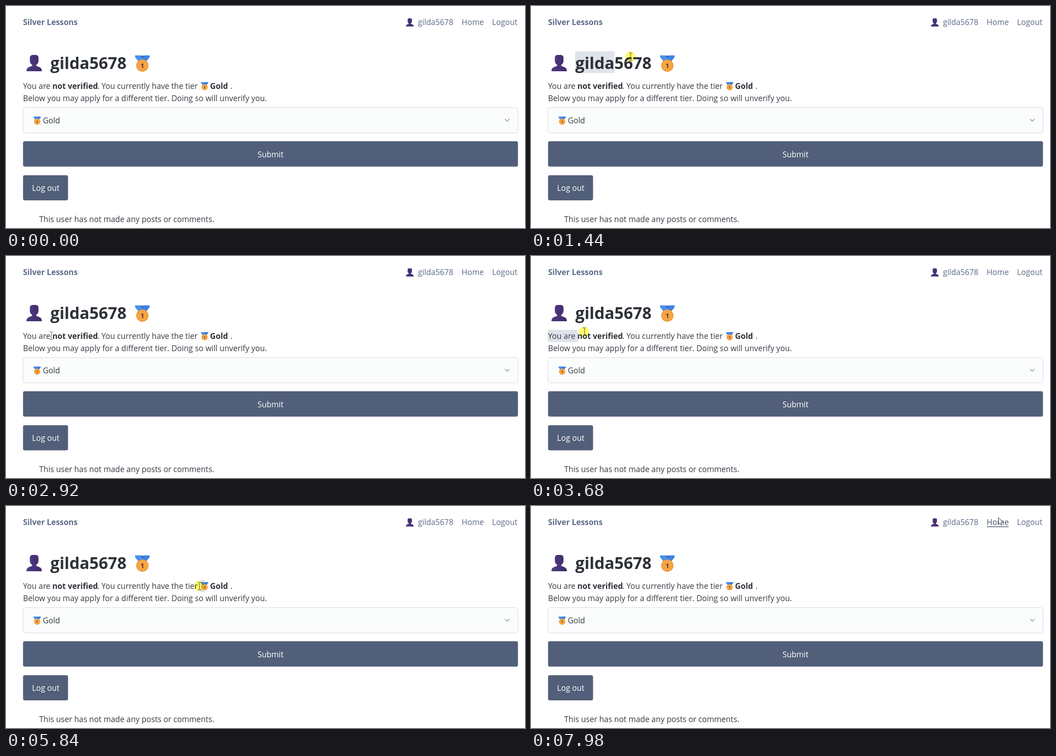
An HTML page with a canvas that plays this animation: 1142x490 px, repeating every 8 s.

```html
<!DOCTYPE html>
<html lang="en">
<head>
<meta charset="utf-8">
<title>Profile page</title>
<style>
  html, body { margin: 0; width: 100%; height: 100%; overflow: hidden; background: #fff; }
  canvas { display: block; }
</style>
</head>
<body>
<canvas id="stage" width="1142" height="490"></canvas>
<script>
const ctx = document.getElementById('stage').getContext('2d');
const LOOP = 8000, STEP = 68, LAG = 60;
const FAMILY = '"Open Sans", "Noto Sans", sans-serif';
const REGULAR = `17.25px ${FAMILY}`;
const BOLD = `bold 17.25px ${FAMILY}`;
const HEADING = `bold 35.7px ${FAMILY}`;
const INK = '#373c44', STRONG = '#2d3138', LINK = '#5d6b89';
const BUTTON = '#525f7a', HOVER = '#48536b', SELECTED = '#dfe3eb';
const USER = 'gilda5678';

const point = (x, y) => ({ x, y });
const mix = (a, b, u) => point(a.x + (b.x - a.x) * u, a.y + (b.y - a.y) * u);
const clamp = (v, low, high) => Math.min(high, Math.max(low, v));
const inside = (p, x, y, w, h) => p.x >= x && p.x < x + w && p.y >= y && p.y < y + h;

// Each move starts where the one before ended and curves towards its bend.
const entry = point(530, 500);
const moves = [];
function move(start, end, to, bend) {
  const from = moves.length ? moves[moves.length - 1].to : entry;
  moves.push({ start, end, from, to, bend: bend || mix(from, to, 0.5) });
}
move(260, 460, point(489, 288));
move(610, 1080, point(102, 128), point(200, 60));
move(1260, 2050, point(337, 128), point(395, 82));
move(2310, 3060, point(39, 175), point(150, 185));
move(3340, 3950, point(173, 168), point(100, 164));
move(4210, 4420, point(202, 168));
move(4500, 4960, point(117, 157), point(125, 168));
move(5020, 5440, point(437, 186), point(270, 165));
move(5840, 6380, point(518, 170), point(370, 140));
move(6450, 6520, point(518, 185));
move(6730, 7450, point(1028, 27), point(600, 140));
move(7540, 7650, point(1028, 25));

const presses = [
  { down: 1260, up: 2110 },
  { down: 3140, up: 4490 },
  { down: 5580, up: 6400 },
  { down: 7850, up: 7980 }
];

const selections = [
  { begin: 1260, release: 2110, clear: 2110, left: 97, right: 325, top: 100, height: 48 },
  { begin: 3340, release: 4490, clear: 5580, left: 37, right: 201, top: 163, height: 27 },
  { begin: 5840, release: 6400, clear: 6450, left: 428, right: 490, top: 163, height: 27 }
];

function pointerAt(t) {
  const m = moves.filter(({ start }) => t >= start).pop();
  if (!m) return point(entry.x, 520);
  const span = m.end - m.start;
  const gaps = Math.round(span / STEP);
  const step = Math.floor((t - m.start) / span * gaps + 0.01) + 1;
  const u = Math.min(1, step / (gaps + 1));
  return mix(mix(m.from, m.bend, u), mix(m.bend, m.to, u), u);
}

function text(str, x, y, font = REGULAR, color = INK, align = 'left') {
  ctx.font = font;
  ctx.fillStyle = color;
  ctx.textAlign = align;
  ctx.fillText(str, x, y);
}

function box(x, y, w, h, fill, stroke) {
  ctx.beginPath();
  ctx.roundRect(x, y, w, h, 4);
  ctx.fillStyle = fill;
  ctx.fill();
  if (stroke) {
    ctx.strokeStyle = stroke;
    ctx.lineWidth = 1;
    ctx.stroke();
  }
}

function polyline(...points) {
  ctx.beginPath();
  points.forEach(p => ctx.lineTo(...p));
}

function disc(x, y, r, color) {
  ctx.beginPath();
  ctx.arc(x, y, r, 0, Math.PI * 2);
  ctx.fillStyle = color;
  ctx.fill();
}

function at(x, y, scale, draw) {
  ctx.save();
  ctx.translate(x, y);
  ctx.scale(scale, scale);
  draw();
  ctx.restore();
}

function ribbon(side, color) {
  polyline([16 * side, -18], [4 * side, -18], [-4 * side, -5], [8 * side, -4], [16 * side, -14]);
  ctx.fillStyle = color;
  ctx.fill();
}

function medal() {
  ctx.fillStyle = '#2f66bd';
  ctx.fillRect(-6, -17.5, 12, 14);
  ribbon(1, '#3f83e4');
  ribbon(-1, '#4a90ee');
  disc(0, 4.5, 13.5, '#e8943a');
  disc(0, 4, 12.2, '#f7a540');
  text('1', 0, 9.5, `bold 15px ${FAMILY}`, '#63344a', 'center');
}

function person() {
  const shade = ctx.createLinearGradient(-17, 0, 17, 0);
  shade.addColorStop(0, '#4f3a86');
  shade.addColorStop(1, '#402a69');
  ctx.fillStyle = shade;
  ctx.beginPath();
  ctx.roundRect(-9.5, -18, 19, 23, [6, 6, 10, 10]);
  ctx.rect(-4.5, 2, 9, 8);
  ctx.fill();
  ctx.beginPath();
  ctx.moveTo(-17, 18);
  ctx.bezierCurveTo(-17, 9, -11, 9, -4, 6);
  ctx.lineTo(4, 6);
  ctx.bezierCurveTo(11, 9, 17, 9, 17, 18);
  ctx.fill();
}

function drawSelections(t) {
  for (const s of selections) {
    if (t < s.begin || t >= s.clear) continue;
    // The highlight trails the pointer by one sample.
    const { x } = pointerAt(Math.min(t, s.release) - LAG);
    ctx.fillStyle = SELECTED;
    ctx.fillRect(s.left, s.top, clamp(x, s.left, s.right) - s.left, s.height);
  }
}

function drawNav(pointer) {
  const overHome = inside(pointer, 1003, 18, 49, 32);
  text('Silver Lessons', 37.5, 42, BOLD, LINK);
  at(888.5, 36.3, 0.5, person);
  text(USER, 906.5, 42, REGULAR, LINK);
  text('Home', 1002.5, 42, REGULAR, overHome ? HOVER : LINK);
  text('Logout', 1069.5, 42, REGULAR, LINK);
  if (overHome) {
    ctx.fillStyle = HOVER;
    ctx.fillRect(1003, 45, 48, 1.5);
  }
}

function drawProfile() {
  at(62, 126, 1, person);
  text(USER, 97.5, 139, HEADING, STRONG);
  at(300, 127, 1, medal);

  text('You are', 37.5, 183);
  text('not verified', 102, 183, BOLD, STRONG);
  text('. You currently have the tier', 201, 183);
  at(437, 177, 0.5, medal);
  text('Gold', 449, 183, BOLD, STRONG);
  text('.', 494, 183);
  text('Below you may apply for a different tier. Doing so will unverify you.', 37.5, 210);
}

function drawForm(pointer) {
  box(37.5, 224.5, 1089, 55.5, '#fbfcfc', '#cfd5e2');
  at(68.5, 253, 0.5, medal);
  text('Gold', 81, 259);
  polyline([1098, 249.5], [1103, 254.5], [1108, 249.5]);
  ctx.strokeStyle = '#8891a4';
  ctx.lineWidth = 1.5;
  ctx.stroke();

  box(37.5, 298.5, 1089, 56, inside(pointer, 37, 299, 1090, 56) ? HOVER : BUTTON);
  text('Submit', 582, 334, REGULAR, '#fff', 'center');
  box(37.5, 373.5, 99, 55.5, BUTTON);
  text('Log out', 87.5, 408, REGULAR, '#fff', 'center');
  text('This user has not made any posts or comments.', 73, 477);
}

function arrow() {
  polyline([0.5, 0.5], [0.5, 15.5], [3.8, 12.3], [6.2, 17.7], [8.6, 16.6], [6.3, 11.4], [10.8, 11.2]);
  ctx.closePath();
  ctx.fillStyle = '#fff';
  ctx.fill();
  ctx.strokeStyle = '#222';
  ctx.lineWidth = 1;
  ctx.stroke();
}

function textCaret() {
  ctx.globalCompositeOperation = 'difference';
  ctx.fillStyle = '#bbb';
  ctx.fillRect(-0.5, -8, 1, 16);
  for (const y of [-9, 8]) {
    ctx.fillRect(-3.5, y, 3, 1);
    ctx.fillRect(0.5, y, 3, 1);
  }
}

function drawPointer(t, p) {
  if (presses.some(({ down, up }) => t >= down && t < up)) {
    ctx.save();
    ctx.globalCompositeOperation = 'multiply';
    disc(p.x, p.y, 11, '#fffb6b');
    ctx.restore();
  }
  const overText = inside(p, 97, 100, 228, 48) || inside(p, 41, 163, 457, 27) ||
    inside(p, 41, 190, 533, 27);
  const x = Math.round(p.x), y = Math.round(p.y);
  if (overText) at(x + 0.5, y, 1, textCaret);
  else at(x, y, 1, arrow);
}

function frame(now) {
  const t = now % LOOP;
  const pointer = pointerAt(t);
  ctx.fillStyle = '#fff';
  ctx.fillRect(0, 0, 1142, 490);
  drawSelections(t);
  drawNav(pointer);
  drawProfile();
  drawForm(pointer);
  drawPointer(t, pointer);
  requestAnimationFrame(frame);
}

requestAnimationFrame(frame);
</script>
</body>
</html>
```
